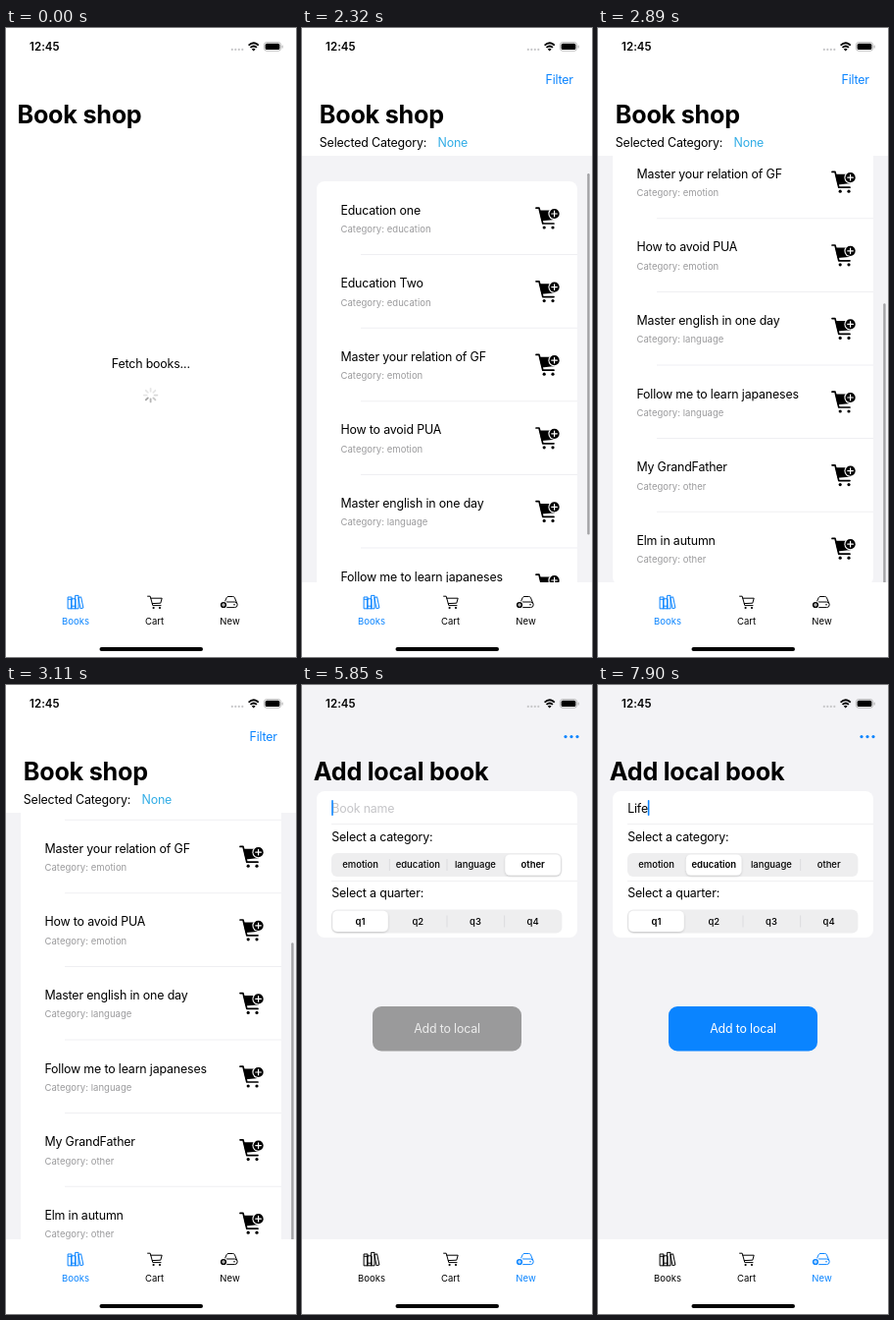
These frames come from a looping animation (296 by 640 pixels, 8000 ms). An HTML page:

```html
<!DOCTYPE html>
<html lang="en">
<head>
<meta charset="utf-8">
<title>Book shop</title>
<style>
  html, body { margin: 0; width: 100%; height: 100%; overflow: hidden; background: #fff; }
  svg { display: block; width: 296px; height: 640px; }
  text { font-family: Inter, Roboto, "Liberation Sans", sans-serif; white-space: pre; }
  .title { font-size: 25.2px; font-weight: 700; letter-spacing: -.25px; }
  .body { font-size: 12.4px; letter-spacing: -.16px; }
  .small { font-size: 9.5px; letter-spacing: .04px; }
  .segment { font-size: 9.5px; font-weight: 500; }
  .segment.on { font-weight: 600; letter-spacing: -.05px; }
  .clock { font-size: 11.5px; font-weight: 600; letter-spacing: .05px; }
  .mid { text-anchor: middle; }
  .line { fill: none; stroke: currentColor; stroke-width: 1; stroke-linecap: round; stroke-linejoin: round; }
</style>
</head>
<body>
<svg id="stage" viewBox="0 0 296 640"></svg>
<script>
const LOOP = 8000;
const BLUE = '#0a84ff', GREY = '#f3f3f6', RULE = '#ececef';
const LIST_AT = 2320, FORM_AT = 4060, CARET_AT = 5850, PICK_AT = 7560;
const SPIN_TIMES = [130, 250, 360, 500, 610, 710, 820, 930, 1040, 1140];
const SCROLL = [[2320, 0], [2440, 88], [2560, 168], [2670, 194], [2790, 186], [2900, 176], [3010, 170], [3110, 168]];
const TYPING = [[0, ''], [6480, 'L'], [6600, 'Li'], [7260, 'Lif'], [7370, 'Life']];
const SLIDE = [[0, 0], [PICK_AT, .15], [7670, .75], [7790, .95], [7900, 1]];
const SCROLL_END = 168, ROW = 74.6, CARD_TOP = 156, SEG = 58.7;

const BOOKS = [
  ['Education one', 'education'], ['Education Two', 'education'],
  ['Master your relation of GF', 'emotion'], ['How to avoid PUA', 'emotion'],
  ['Master english in one day', 'language'], ['Follow me to learn japaneses', 'language'],
  ['My GrandFather', 'other'], ['Elm in autumn', 'other']
];

const text = (x, y, str, cls = 'body', fill = '#000', extra = '') =>
  `<text x="${x}" y="${y}" class="${cls}" fill="${fill}" ${extra}>${str}</text>`;
const rect = (x, y, w, h, fill, r = 0, extra = '') =>
  `<rect x="${x}" y="${y}" width="${w}" height="${h}" rx="${r}" fill="${fill}" ${extra}/>`;
const dot = (x, y, r, fill = 'currentColor') => `<circle cx="${x}" cy="${y}" r="${r}" fill="${fill}"/>`;
const line = (d, extra = '') => `<path class="line" d="${d}" ${extra}/>`;
const rule = (x, y) => rect(x, y - .4, 281 - x, .8, RULE);
const dots = (xs, y, r, fill) => xs.map(x => dot(x, y, r, fill)).join('');

const statusBar = () => text(24, 23.2, '12:45', 'clock')
  + dots([230.8, 234.3, 237.8, 241.3], 21.9, 1.1, '#c6c6c8')
  + line('M247.6 17.6Q252.7 13 257.8 17.6M249.5 19.9Q252.7 17.1 255.9 19.9', 'style="stroke-width:1.8;stroke-linecap:butt"')
  + '<path d="M250.8 21.4Q252.7 19.9 254.6 21.4L252.7 23.4Z"/>'
  + rect(263.4, 14.6, 17.2, 8.6, 'none', 2.6, 'stroke="#aaa" stroke-width=".8"')
  + rect(264.6, 15.8, 14.8, 6.2, '#000', 1.6)
  + rect(281.6, 17.4, 1, 3, '#aaa', .5);

const cartPlus = y => `<g transform="translate(238 ${y})">`
  + line('M1 1.4H4L7.8 17.2H19', 'style="stroke-width:1.7"')
  + '<path d="M4.3 3.8H21.6L19.8 13.2 6.6 14.4Z"/>'
  + dots([9.2, 18], 21.2, 1.6, '#000') + dot(19.6, 7.2, 6.2, '#fff') + dot(19.6, 7.2, 5.1, '#000')
  + line('M16.8 7.2H22.4M19.6 4.4V10', 'style="stroke:#fff;stroke-width:1.2"') + '</g>';

const bookRow = ([name, category], i) => {
  const y = CARD_TOP + i * ROW;
  return text(39.4, y + 33.5, name) + text(39.5, y + 52, 'Category: ' + category, 'small', '#9a9a9c')
    + cartPlus(y + 25.8) + (i ? rule(60, y) : '');
};

const tabBar = () => rect(0, 564, 296, 76, '#fff')
  + '<g id="tabBooks">'
  + line('M63.5 579H67V590.8H63.5ZM67 580.8H71V590.8H67ZM71 577.4H74V590.8H71ZM67 588.2H71M63.5 581.3H67M74.3 579.4L76.6 578.9 78.9 590 76.4 590.6Z')
  + text(71, 607.4, 'Books', 'small mid', 'currentColor') + '</g><g>'
  + line('M144.6 578.2H147.2L149.8 587.6H158M147.8 580.2H159.2L157.8 585.2 149.3 585.6')
  + dots([150.6, 157], 590, 1.1) + text(151.6, 606.6, 'Cart', 'small mid') + '</g><g id="tabNew">'
  + line('M223 584.6L225.2 579.6Q225.7 578.5 227 578.5H231.6Q232.9 578.5 233.4 579.6L235.6 585M225 584H233.4A2.7 2.7 0 0 1 233.4 589.6H225')
  + dot(233, 586.8, .8) + dot(222, 587, 4, '#fff') + dot(222, 587, 3.1)
  + line('M220.5 587H223.5M222 585.5V588.5', 'style="stroke:#fff;stroke-width:.9"')
  + text(228.5, 606.6, 'New', 'small mid', 'currentColor') + '</g>'
  + rect(95.5, 630, 105.5, 4, '#000', 2);

const segmented = (id, y, labels) => `<g id="${id}">` + rect(30, y, 235.4, 24, '#eeeeef', 6)
  + [1, 2, 3].map(i => rect(30.2 + SEG * i, y + 6, .8, 12, '#d8d8db', 0, 'class="divider"')).join('')
  + rect(31.2, y + 1.4, 56.6, 21.2, '#fff', 5, 'class="thumb" filter="url(#lift)"')
  + labels.map((s, i) => text(30.2 + SEG * (i + .5), y + 15.4, s, 'segment mid')).join('') + '</g>';

const blades = () => Array.from({ length: 8 }, (_, i) =>
  `<path class="blade" d="M0 -3.9V-6.8" stroke="#000" stroke-width="1.8" stroke-linecap="round" transform="translate(147.6 373.6) rotate(${i * 45})"/>`).join('');

document.getElementById('stage').innerHTML = `
  <defs>
    <clipPath id="view"><rect y="130" width="296" height="434"/></clipPath>
    <filter id="lift" x="-10%" y="-20%" width="120%" height="150%">
      <feDropShadow dx="0" dy="1" stdDeviation="1.2" flood-opacity=".18"/>
    </filter>
  </defs>
  ${rect(0, 0, 296, 640, '#fff')}
  <g id="loading">
    ${text(11.5, 96.6, 'Book shop', 'title')}
    ${text(147.8, 346.4, 'Fetch books...', 'body mid')}${blades()}
  </g>
  <g id="list">
    ${text(17.8, 96.6, 'Book shop', 'title')}${text(248.5, 57.3, 'Filter', 'body', BLUE)}
    ${text(17.8, 121.2, 'Selected Category:')}${text(138.5, 121.2, 'None', 'body', '#32ade6')}
    <g clip-path="url(#view)">
      ${rect(0, 130, 296, 434, GREY)}
      <g id="rows">${rect(15, CARD_TOP, 266, ROW * BOOKS.length, '#fff', 8)}${BOOKS.map(bookRow).join('')}</g>
      ${rect(291.2, 148, 2.4, 367.5, '#a2a2a5', 1.2, 'id="bar"')}
    </g>
  </g>
  <g id="form">
    ${rect(0, 0, 296, 564, GREY)}${dots([269, 275, 281], 52.6, 1.6, BLUE)}
    ${text(11.8, 96.6, 'Add local book', 'title')}
    ${rect(15, 108, 266, 149, '#fff', 8)}${rule(30, 141.5)}${rule(30, 199.5)}
    ${text(30.2, 130, 'Book name', 'body', '#c5c5c8', 'id="field"')}
    ${rect(30.4, 117, 1.6, 16, BLUE, .8, 'id="caret"')}
    ${text(30.2, 158.8, 'Select a category:')}${text(30.2, 216.4, 'Select a quarter:')}
    ${segmented('category', 171, ['emotion', 'education', 'language', 'other'])}
    ${segmented('quarter', 228.4, ['q1', 'q2', 'q3', 'q4'])}
    ${rect(72, 327, 152, 45.5, '#9a9a9b', 9, 'id="button"')}
    ${text(148, 354.4, 'Add to local', 'body mid', '#fff', 'id="buttonText"')}
  </g>
  ${statusBar()}${tabBar()}`;

const $ = id => document.getElementById(id);
const show = (el, on) => el.style.display = on ? '' : 'none';
const valueAt = (steps, t) => steps.reduce((v, [at, next]) => t >= at ? next : v, steps[0][1]);

function select(id, index, position = index) {
  const group = $(id);
  group.querySelector('.thumb').setAttribute('x', 31.2 + SEG * position);
  group.querySelectorAll('text').forEach((el, i) => el.classList.toggle('on', i === index));
  group.querySelectorAll('.divider').forEach((el, i) => show(el, i !== index && i + 1 !== index));
}

function drawSpinner(t) {
  const head = 5 + SPIN_TIMES.filter(at => t >= at).length;
  document.querySelectorAll('.blade').forEach((el, i) => {
    const age = (head - i + 16) % 8;
    el.setAttribute('stroke-opacity', Math.max(.1, .36 - age * .07));
  });
}

function drawList(t) {
  const offset = valueAt(SCROLL, t);
  // Past the end of the list the bar follows the overscroll one to one.
  const bar = 148 + Math.min(offset, SCROLL_END) * .68 + Math.max(0, offset - SCROLL_END);
  $('rows').setAttribute('transform', `translate(0 ${-offset})`);
  $('bar').setAttribute('y', bar);
}

function drawForm(t) {
  const typed = valueAt(TYPING, t), field = $('field');
  field.textContent = typed || 'Book name';
  field.setAttribute('fill', typed ? '#000' : '#c5c5c8');
  $('caret').setAttribute('x', 30.2 + (typed ? field.getComputedTextLength() - .2 : 0));
  show($('caret'), t >= CARET_AT);
  $('button').setAttribute('fill', typed ? BLUE : '#9a9a9b');
  $('buttonText').setAttribute('fill', typed ? '#fff' : '#ececec');
  select('category', t < PICK_AT ? 3 : 1, 3 - 2 * valueAt(SLIDE, t));
}

function render(t) {
  const onForm = t >= FORM_AT, onList = t >= LIST_AT && !onForm;
  show($('loading'), t < LIST_AT);
  show($('list'), onList);
  show($('form'), onForm);
  $('tabBooks').setAttribute('color', onForm ? '#000' : BLUE);
  $('tabNew').setAttribute('color', onForm ? BLUE : '#000');
  if (onForm) drawForm(t);
  else if (onList) drawList(t);
  else drawSpinner(t);
}

select('quarter', 0);
const start = performance.now();
function tick() {
  render((performance.now() - start) % LOOP);
  requestAnimationFrame(tick);
}
tick();
</script>
</body>
</html>
```
